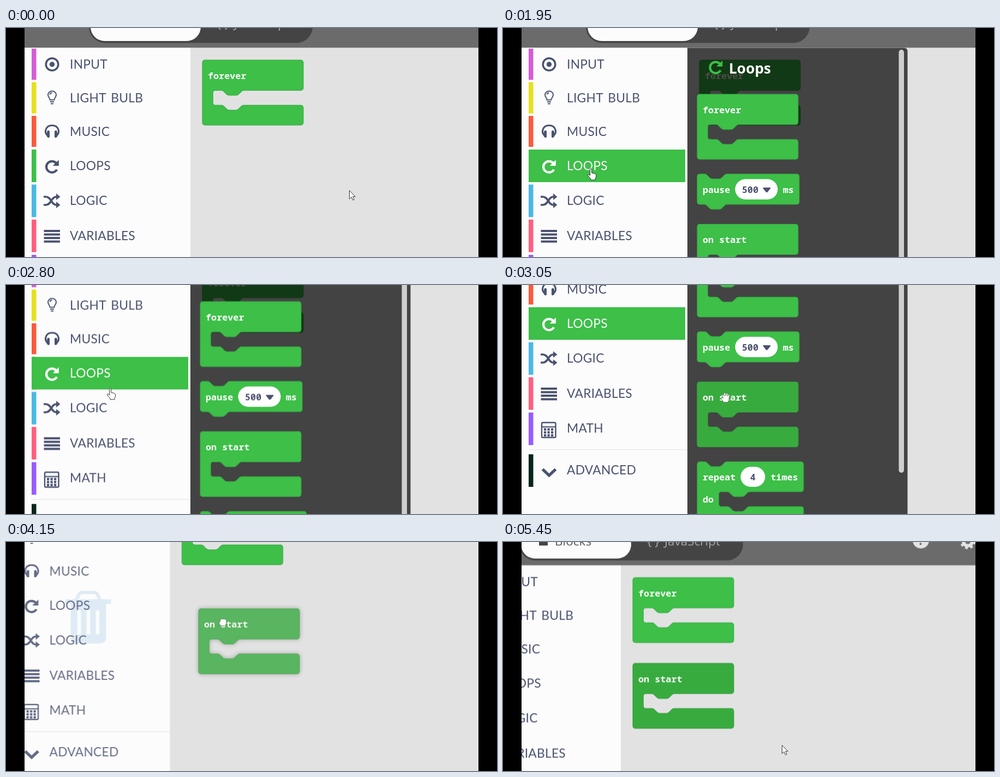
These frames come from a looping animation (900x422 px, 5800 ms). An HTML page:

```html
<!DOCTYPE html>
<html lang="en">
<head>
<meta charset="utf-8">
<title>Block editor</title>
<style>
html, body { margin: 0; width: 100%; height: 100%; overflow: hidden; background: #000; }
svg { display: block; width: 900px; height: 422px; }

.menu { font: 22.8px Lato, sans-serif; letter-spacing: .25px; word-spacing: 3px; fill: #4a5270; }
.code { font: bold 16.8px "Noto Sans Mono", monospace; fill: #fff; white-space: pre; }
.value { font-weight: 600; fill: #4b5270; }
.head { font: 22.5px "Open Sans", sans-serif; }
.line { fill: none; stroke: currentColor; }
.solid { fill: currentColor; }
.icons { color: #4a5270; }
.on { fill: #fff; color: #fff; }
.block { fill: var(--fill, #3dbf48); stroke: var(--edge, #35a840); stroke-width: .9; }
.dark { --fill: #38ab3f; --edge: #319a39; }

.anim { animation: 5800ms step-end infinite; }
#cam { animation-name: cam; }
#cursor { animation-name: cursor; }
#drag { animation-name: drag; filter: drop-shadow(0 0 4px rgba(0,0,0,.35)); }
#flyout { animation-name: flyout; }
#loopsOn { animation-name: loops-on; }
#logicOn { animation-name: logic-on; }
#hover { animation-name: hover; }
#dropped { animation-name: dropped; }
#trash { animation-name: trash; }
#items { animation-name: items; }
#arrow { animation-name: arrow; }
#point { animation-name: point; }
#open { animation-name: open; }
#grab { animation-name: grab; }

@keyframes cam {
  0% { transform: translate(0, 0); }
  43.965% { transform: translate(0, 0); animation-timing-function: steps(11); }
  53.448% { transform: translate(0, -201.3px); }
  68.103% { transform: translate(0, -201.3px); animation-timing-function: steps(4); }
  71.551% { transform: translate(-37.5px, -137px); animation-timing-function: steps(8); }
  78.448%, 100% { transform: translate(-122px, 6.5px); }
}
@keyframes cursor {
  0% { transform: translate(629px, 299px); }
  7.758% { transform: translate(629px, 299px); animation-timing-function: steps(5); }
  16.379% { transform: translate(200px, 322px); }
  17.241% { transform: translate(200px, 322px); animation-timing-function: steps(3); }
  22.413% { transform: translate(161px, 259px); }
  44.827% { transform: translate(161px, 259px); animation-timing-function: steps(4); }
  48.275% { transform: translate(191px, 281.5px); animation-timing-function: steps(5); }
  52.586% { transform: translate(408px, 390px); }
  57.758% { transform: translate(408px, 390px); animation-timing-function: steps(4); }
  64.655% { transform: translate(440px, 300px); }
  68.103% { transform: translate(440px, 300px); animation-timing-function: steps(4); }
  71.551% { transform: translate(435.5px, 284px); animation-timing-function: steps(8); }
  78.448% { transform: translate(417px, 256.5px); }
  86.206% { transform: translate(417px, 256.5px); animation-timing-function: steps(2); }
  89.655% { transform: translate(470px, 300px); }
  90.517% { transform: translate(470px, 300px); animation-timing-function: steps(2); }
  93.965%, 100% { transform: translate(633px, 367.5px); }
}
@keyframes drag {
  0% { transform: translate(356px, 361.5px); opacity: 0; }
  59.482% { transform: translate(366px, 340px); opacity: .8; animation-timing-function: steps(3); }
  64.655% { transform: translate(395px, 275px); opacity: .8; }
  68.103% { transform: translate(395px, 275px); opacity: .8; animation-timing-function: steps(4); }
  71.551% { transform: translate(390.5px, 260px); opacity: .8; animation-timing-function: steps(8); }
  78.448% { transform: translate(364.5px, 230px); opacity: .8; }
  81.896%, 100% { transform: translate(364.5px, 230px); opacity: 0; }
}
@keyframes flyout { 0% { opacity: 0; } 33.62% { opacity: 1; } 59.482%, 100% { opacity: 0; } }
@keyframes loops-on { 0% { opacity: 0; } 20.689% { opacity: 1; } 59.482%, 100% { opacity: 0; } }
@keyframes logic-on { 0% { opacity: 0; } 14.655% { opacity: 1; } 20.689%, 100% { opacity: 0; } }
@keyframes hover { 0% { opacity: 0; } 51.724%, 100% { opacity: 1; } }
@keyframes dropped { 0% { opacity: 0; } 81.896%, 100% { opacity: 1; } }
@keyframes trash {
  0% { opacity: 0; }
  59.482% { opacity: .3; animation-timing-function: steps(14); }
  71.551% { opacity: .6; animation-timing-function: steps(8); }
  78.448% { opacity: 1; }
  81.896% { opacity: .5; }
  83.62%, 100% { opacity: 0; }
}
@keyframes items {
  0% { opacity: 1; }
  59.482% { opacity: 1; animation-timing-function: steps(14); }
  71.551% { opacity: .85; animation-timing-function: steps(8); }
  78.448% { opacity: .75; }
  81.896% { opacity: .88; }
  83.62%, 100% { opacity: 1; }
}
@keyframes arrow { 0% { opacity: 1; } 14.655% { opacity: 0; } 87.931%, 100% { opacity: 1; } }
@keyframes point { 0% { opacity: 0; } 14.655% { opacity: 1; } 51.724%, 100% { opacity: 0; } }
@keyframes open { 0% { opacity: 0; } 51.724% { opacity: 1; } 55.172% { opacity: 0; } 81.896% { opacity: 1; } 87.931%, 100% { opacity: 0; } }
@keyframes grab { 0% { opacity: 0; } 55.172% { opacity: 1; } 81.896%, 100% { opacity: 0; } }
</style>
</head>
<body>
<svg viewBox="0 0 900 422">
<defs>
  <path id="wrap" class="block" transform="scale(1.13)" d="M0 4a4 4 0 0 1 4-4H159.7a4 4 0 0 1 4 4V45.6a4 4 0 0 1-4 4H67c-2 0-3 1-4 2l-4 4c-1 1-2 2-4 2h-12c-2 0-3-1-4-2l-4-4c-1-1-2-2-4-2H21a4 4 0 0 0-4 4v16a4 4 0 0 0 4 4H31c2 0 3 1 4 2l4 4c1 1 2 2 4 2h12c2 0 3-1 4-2l4-4c1-1 2-2 4-2H159.7a4 4 0 0 1 4 4V102.2a4 4 0 0 1-4 4H4a4 4 0 0 1-4-4z"/>
  <path id="stack" class="block" transform="scale(1.13)" d="M0 4a4 4 0 0 1 4-4H12c2 0 3 1 4 2l4 4c1 1 2 2 4 2h12c2 0 3-1 4-2l4-4c1-1 2-2 4-2H161.5a4 4 0 0 1 4 4V45.6a4 4 0 0 1-4 4H48c-2 0-3 1-4 2l-4 4c-1 1-2 2-4 2h-12c-2 0-3-1-4-2l-4-4c-1-1-2-2-4-2H4a4 4 0 0 1-4-4z"/>
  <path id="repeat" class="block" transform="scale(1.13)" d="M0 4a4 4 0 0 1 4-4H12c2 0 3 1 4 2l4 4c1 1 2 2 4 2h12c2 0 3-1 4-2l4-4c1-1 2-2 4-2H168.5a4 4 0 0 1 4 4V45a4 4 0 0 1-4 4H85c-2 0-3 1-4 2l-4 4c-1 1-2 2-4 2h-12c-2 0-3-1-4-2l-4-4c-1-1-2-2-4-2H39a4 4 0 0 0-4 4v16a4 4 0 0 0 4 4H49c2 0 3 1 4 2l4 4c1 1 2 2 4 2h12c2 0 3-1 4-2l4-4c1-1 2-2 4-2H168.5a4 4 0 0 1 4 4V102a4 4 0 0 1-4 4H4a4 4 0 0 1-4-4z"/>
  <g id="forever"><use href="#wrap"/><text class="code" x="10" y="34.5">forever</text></g>
  <g id="start"><use href="#wrap"/><text class="code" x="10" y="34.5">on start</text></g>
  <g id="loop">
    <path class="line" stroke-width="4.2" d="M8 -6.5A10.3 10.3 0 1 0 9.2 5.5"/>
    <path class="solid" d="M12.8 -12.5V-1.5H1.8z"/>
  </g>
  <g id="shuffle">
    <path class="line" stroke-width="3.7" d="M-15 -7.5h4C-1 -7.5 -1 7.5 8 7.5M-15 7.5h4C-1 7.5 -1 -7.5 8 -7.5"/>
    <path class="solid" d="M8 -13.5l7.5 6-7.5 6zM8 1.5l7.5 6-7.5 6z"/>
  </g>
</defs>

<g id="cam" class="anim">
  <rect x="0" y="30" width="1100" height="700" fill="#e2e2e2"/>
  <use href="#forever" x="360" y="59"/>
  <g id="dropped" class="anim dark"><use href="#start" x="360" y="217"/></g>

  <g id="flyout" class="anim">
    <path d="M338 36.5H735.5a6 6 0 0 1 6 6V720H338z" fill="#000" fill-opacity=".7"/>
    <rect x="725.5" y="40" width="9.5" height="489" rx="4.7" fill="#cecece"/>
    <use href="#loop" x="389.5" y="72.5" color="#3dbf48"/>
    <text x="414" y="83.5" fill="#fff" class="head" style="font-size:26.3px;font-weight:700">Loops</text>
    <use href="#forever" x="356" y="122"/>
    <use href="#stack" x="356" y="269"/>
    <text class="code" x="366" y="303.5">pause</text>
    <rect x="425.5" y="278.5" width="78" height="37.5" rx="18.7" fill="#fff"/>
    <text class="code value" x="438" y="303.5">500</text>
    <path d="M477.5 294h12q2 0 .8 1.6l-5 6.4q-1.8 2-3.6 0l-5-6.4q-1.2-1.6 .8-1.6z" fill="#4b5270"/>
    <text class="code" x="513" y="303.5">ms</text>
    <use href="#start" x="356" y="361.5"/>
    <g id="hover" class="anim dark"><use href="#start" x="356" y="361.5"/></g>
    <use href="#repeat" x="356" y="508.7"/>
    <text class="code" x="366" y="543">repeat</text>
    <rect x="435.5" y="518" width="45" height="37" rx="18.5" fill="#fff"/>
    <text class="code value" x="453" y="543">4</text>
    <text class="code" x="490.5" y="543">times</text>
    <text class="code" x="366" y="584">do</text>
  </g>

  <rect x="0" y="30" width="338" height="700" fill="#fcfcfc"/>
  <g id="trash" class="anim" fill="#cbe0ee">
    <path d="M166 244l5-10q2-4 6-4h22q4 0 6 4l5 10" fill="none" stroke="#cbe0ee" stroke-width="6"/>
    <rect x="146" y="242.5" width="84" height="8.5"/>
    <path d="M156 251h65v61q0 12-11 12h-43q-11 0-11-12z"/>
    <path d="M171.5 263v44M188.5 263v44M205.5 263v44" stroke="#fcfcfc" stroke-width="6.5"/>
  </g>
  <rect x="47" y="38" width="8.5" height="57.5" fill="#d65cd6"/>
  <rect x="47" y="100" width="8.5" height="57.5" fill="#e6e01f"/>
  <rect x="47" y="162" width="8.5" height="57" fill="#fb5a3c"/>
  <rect x="47" y="224" width="8.5" height="60" fill="#3dbf48"/>
  <rect x="47" y="288.5" width="8.5" height="60" fill="#4bb9e4"/>
  <rect x="47" y="353" width="8.5" height="60" fill="#ff6080"/>
  <rect x="47" y="418" width="8.5" height="60" fill="#9a5cff"/>
  <rect x="47" y="495" width="8.5" height="60" fill="#06251f"/>
  <rect x="47" y="486" width="291" height="1" fill="#e2e2e2"/>

  <g id="items" class="anim">
    <g class="menu">
      <text x="117" y="75">INPUT</text>
      <text x="117" y="137">LIGHT BULB</text>
      <text x="117" y="198.5">MUSIC</text>
      <text x="117" y="262">LOOPS</text>
      <text x="117" y="326">LOGIC</text>
      <text x="117" y="391">VARIABLES</text>
      <text x="117" y="455">MATH</text>
      <text x="117" y="532">ADVANCED</text>
    </g>
    <g class="icons">
      <circle class="line" cx="84.5" cy="67" r="11.3" stroke-width="3.5"/>
      <circle class="solid" cx="84.5" cy="67" r="4.7"/>
      <path class="line" stroke-width="2" d="M80.5 132.5c0-4-3.5-5-3.5-9.5a7.5 6.7 0 0 1 15 0" visibility="hidden"/>
      <path class="line" stroke-width="2" d="M80.5 132.5C80.5 128.5 77 127.5 77 123A7.5 6.7 0 0 1 92 123C92 127.5 88.5 128.5 88.5 132.5zM81 136h7M82 139.5h5M80.5 122.5q.5-3 4-3"/>
      <path class="line" stroke-width="3.2" d="M76 197.5C70 195 71 179.5 84.5 179.5S99 195 93 197.5"/>
      <path class="solid" d="M76 189h2.5q1.5 0 1.5 1.5v10q0 1.5-1.5 1.5H77q-3-2-3-6zM93 189h-2.5q-1.5 0-1.5 1.5v10q0 1.5 1.5 1.5H92q3-2 3-6z"/>
      <use href="#loop" x="84" y="255.5"/>
      <use href="#shuffle" x="84" y="318.5"/>
      <path class="line" stroke-width="3.8" d="M69.5 374h29.5M69.5 380.5h29.5M69.5 387h29.5M69.5 393.5h29.5"/>
      <rect class="line" x="71" y="436.5" width="25.5" height="27.5" rx="2" stroke-width="2.4"/>
      <path class="line" stroke-width="2.2" d="M71 444.5h25.5"/>
      <path class="line" stroke-width="4.2" stroke-dasharray="4.2 2.3" d="M75 449.2h18M75 454.7h18M75 460.2h18"/>
      <path class="line" stroke-width="5.2" d="M72.5 522.5l12 11.5 12-11.5"/>
    </g>
  </g>
  <g id="loopsOn" class="anim">
    <rect x="47" y="224" width="287" height="60" fill="#3dbf48"/>
    <text class="menu" style="fill:#fff" x="117" y="262">LOOPS</text>
    <use class="on" href="#loop" x="84" y="255.5"/>
  </g>
  <g id="logicOn" class="anim">
    <rect x="47" y="288.5" width="287" height="60" fill="#4bb9e4"/>
    <text class="menu" style="fill:#fff" x="117" y="326">LOGIC</text>
    <use class="on" href="#shuffle" x="84" y="318.5"/>
  </g>

  <g class="head">
    <rect x="0" y="-60" width="1100" height="96.3" fill="#6b6b6b"/>
    <rect x="152" y="-32" width="410" height="59.5" rx="29.7" fill="#444"/>
    <rect x="155" y="-28" width="202" height="52" rx="26" fill="#fcfcfc"/>
    <rect x="188" y="-16" width="16" height="16" fill="#444"/>
    <text x="217" y="-.5" fill="#555">Blocks</text>
    <text x="386" y="-.5" fill="#a8a8a8">{ }</text>
    <text x="418" y="-.5" fill="#a8a8a8">JavaScript</text>
    <circle cx="888" cy="-9.5" r="15" fill="#e4e4e4"/>
    <text x="888" y="-1" text-anchor="middle" font-weight="700" fill="#6b6b6b">?</text>
    <circle cx="974" cy="-7.5" r="8" fill="none" stroke="#e4e4e4" stroke-width="6"/>
    <circle cx="974" cy="-7.5" r="12" fill="none" stroke="#e4e4e4" stroke-width="4.5" stroke-dasharray="4.71"/>
  </g>

  <g id="drag" class="anim dark"><use href="#start"/></g>

  <g id="cursor" class="anim" fill="#fff" stroke="#333" stroke-width="1" stroke-linejoin="round">
    <path id="arrow" class="anim" d="M.5 .5V16l3.7-3.5 2.5 5.7 2.6-1.2-2.5-5.4h4.5z"/>
    <path id="point" class="anim" d="M-1.5 1q1.5-2 3 0v7l6 1.5q2.5 1 2.3 3.5-.3 4-1.8 5.5v2.5h-8V19q-3-3-5.5-6.5-.5-2.5 2-1.5l2 2z"/>
    <g stroke-width=".5">
      <path id="open" class="anim" d="M-4 9q-1-3-4-7-.5-2.5 2-1.5l1.5 1.5-1.5-7q1-2 2.5 0l1 3-.5-5.5q1.5-2 2.8 0l.7 5 .8-4.5q1.5-1.5 2.5 0v5l1.2-3q1.7-1 2.2 .5l-1 7q-.5 4-2 6.500z"/>
      <path id="grab" class="anim" d="M-4 7.5q-3-3-3.5-6 .2-2 2-1.5l.5-4q1-2 2.500-.5 1-2 3 0 1.500-1.500 2.800 .3 2-1 2.500 1v5q-.5 3.500-2.300 5.700z"/>
    </g>
  </g>
</g>
<path d="M0 0H34V422H0zM866 0h34V422h-34z"/>
</svg>
</body>
</html>
```
